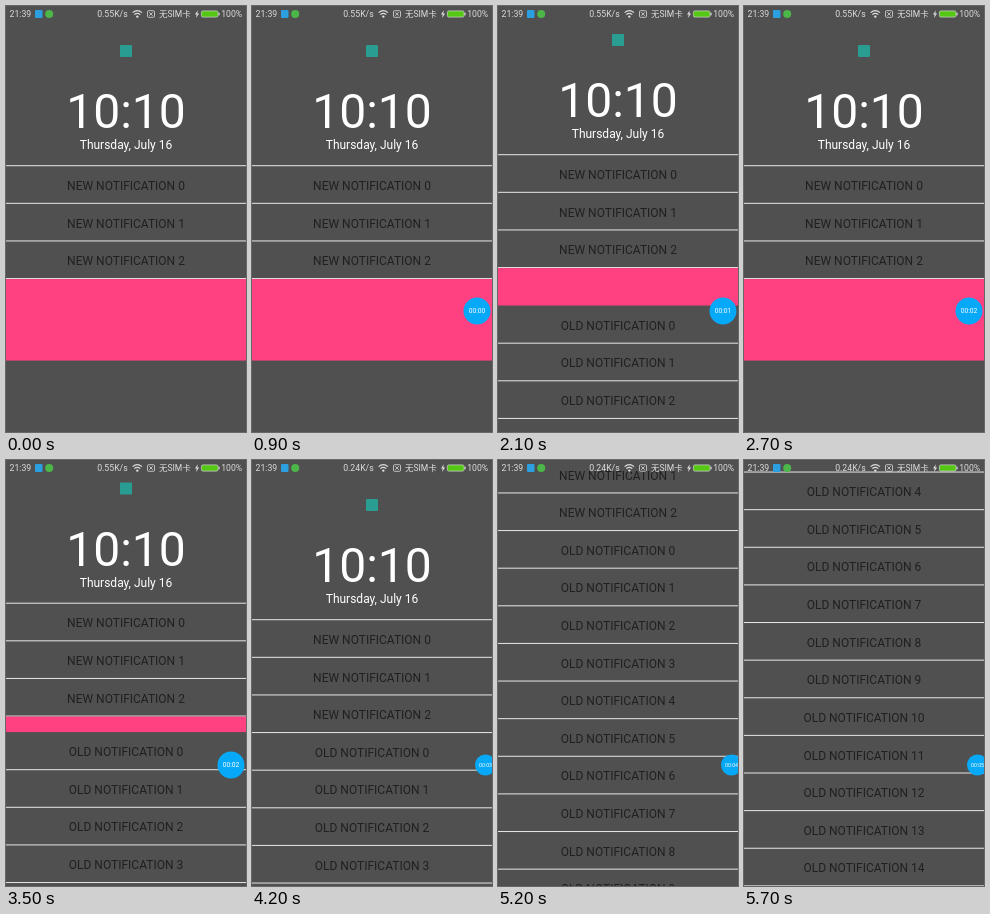
Recreate the animation shown at these times as an HTML page. Size 240 by 426 pixels, loop 5.9 s.

```html
<!DOCTYPE html>
<html lang="en">
<head>
<meta charset="utf-8">
<title>Lock screen notifications</title>
<style>
  html, body { margin: 0; width: 100%; height: 100%; overflow: hidden; background: #505050; }
  svg { display: block; width: 100%; height: 100%; font-family: Roboto, "Noto Sans CJK SC", "Noto Sans CJK", sans-serif; }
  .row text { font-size: 12px; fill: #202020; text-anchor: middle; }
  .row rect { fill: #e6e6e6; }
  #head { fill: #fff; text-anchor: middle; }
  #status { font-size: 8.7px; fill: #dcdcdc; }
  #bubble text { font-size: 6.7px; fill: #fff; text-anchor: middle; }
</style>
</head>
<body>
<svg viewBox="0 0 240 426">
  <rect width="240" height="426" fill="#505050"/>
  <g id="list"></g>
  <rect id="pink" width="240" fill="#ff4081"/>
  <g id="head">
    <rect x="114" y="39" width="12" height="12" rx="1" fill="#2a9d92"/>
    <text x="120" y="122" font-size="48">10:10</text>
    <text x="120" y="143" font-size="12">Thursday, July 16</text>
    <rect y="159.2" width="240" height="1" fill="#e6e6e6"/>
  </g>
  <g id="status">
    <text x="3.6" y="11.4">21:39</text>
    <rect x="29" y="4" width="7.5" height="8" rx="1" fill="#2c9fe0"/>
    <circle cx="43.2" cy="8" r="4" fill="#4cb648"/>
    <text id="speed" x="91.2" y="11.4"></text>
    <g fill="none" stroke="#dcdcdc">
      <path d="M126.6 6.6q4.7-4 9.4 0M128.3 8.6q3-2.5 6 0" stroke-width="1.2"/>
      <rect x="141.5" y="4.7" width="7" height="6.6" rx="1" stroke-width=".8"/>
      <path d="M143.3 6.3l3.4 3.4m0-3.4l-3.4 3.4" stroke-width=".8"/>
    </g>
    <circle cx="131.3" cy="10.6" r="1.2"/>
    <text x="153" y="11.4" font-size="8.5">无SIM卡</text>
    <path d="M191.8 4.2l-2.8 4.3h1.7l-.6 3.5 3-4.5h-1.8z"/>
    <rect x="195.4" y="4.9" width="16.6" height="6.2" rx="1.4" fill="#55c814" stroke="#c4ccc0" stroke-width=".8"/>
    <rect x="212.4" y="6.7" width="1.2" height="2.6"/>
    <text x="215.2" y="11.4">100%</text>
  </g>
  <g id="bubble">
    <circle r="13.5" fill="#06a9f7"/>
    <text y="2.4"></text>
  </g>
</svg>
<script>
const LOOP = 5900, STEP = 100;
const TOP = 159.7, PITCH = 37.62, GAP = 82;
const NEW = 3, OLD = 15;

// [time, value] keys, linear between them
const shift = [
  [1100, 0], [1200, .7], [1600, 4.9], [1800, 7.5], [2000, 10.6], [2100, 11],
  [2200, 8.5], [2300, 5], [2400, 2.8], [2500, 1.3], [2600, .4], [2700, 0],
  [3100, 0], [3200, 1.2], [3300, 5.5], [3400, 11.5], [3500, 16.5], [3600, 18.2], [3700, 18.7],
  [3800, 12], [3900, 6.5], [4000, 2.8], [4100, .8], [4200, 0]
];
const collapse = [[3700, 7.2], [3800, 4.6], [3900, 2.5], [4000, 1.1], [4100, .3], [4200, 0]];
const scroll = [
  [4500, 0], [4600, 4], [4700, 17], [4800, 39], [4900, 66], [5000, 100], [5100, 146],
  [5200, 202], [5300, 259], [5400, 312], [5500, 357], [5600, 391], [5700, 411]
];
const bubbleX = [[0, 256], [500, 224], [600, 225], [3500, 225], [3900, 233.5]];
const bubbleScale = [[0, .6], [500, 1.06], [600, 1], [3500, 1], [3900, .78]];

const $ = id => document.getElementById(id);
const clamp = v => Math.max(0, Math.min(1, v));

function at(keys, t) {
  if (t <= keys[0][0]) return keys[0][1];
  for (let i = 1; i < keys.length; i++) {
    const [t0, a] = keys[i - 1], [t1, b] = keys[i];
    if (t <= t1) return a + (b - a) * (t - t0) / (t1 - t0);
  }
  return keys[keys.length - 1][1];
}

function add(parent, name, attrs) {
  const el = document.createElementNS("http://www.w3.org/2000/svg", name);
  for (const key in attrs) el.setAttribute(key, attrs[key]);
  return parent.appendChild(el);
}

const move = (el, y) => el.setAttribute("transform", `translate(0 ${y})`);

const rows = Array.from({ length: NEW + OLD }, (_, i) => {
  const row = add($("list"), "g", { class: "row" });
  const label = add(row, "text", { x: 120, y: 24.2 });
  label.textContent = i < NEW ? `NEW NOTIFICATION ${i}` : `OLD NOTIFICATION ${i - NEW}`;
  add(row, "rect", { y: PITCH - .5, width: 240, height: 1 });
  return row;
});

const bubble = $("bubble"), timer = bubble.querySelector("text");

function draw(t) {
  const lift = at(shift, t);
  const gap = t < 3700 ? GAP - 4 * lift : at(collapse, t);
  const open = 1 - gap / GAP;
  const offset = -lift - at(scroll, t);

  move($("head"), offset);
  rows.forEach((row, i) => {
    const old = i - NEW;
    move(row, TOP + i * PITCH + offset + (old < 0 ? 0 : gap));
    row.setAttribute("opacity", old < 0 ? 1 : clamp(3.4 * open - .3 * Math.min(old, 4)));
  });

  const pinkTop = TOP + NEW * PITCH + offset + .5;
  $("pink").setAttribute("y", pinkTop);
  $("pink").setAttribute("height", Math.max(0, gap - .5));

  $("speed").textContent = t < 3800 ? "0.55K/s" : "0.24K/s";
  const seconds = Math.max(0, Math.floor((t - 600) / 1000));
  timer.textContent = `00:0${seconds}`;
  bubble.setAttribute("transform", `translate(${at(bubbleX, t)} 305) scale(${at(bubbleScale, t)})`);
}

const start = performance.now();
function tick() {
  const t = (performance.now() - start) % LOOP;
  draw(Math.floor(t / STEP) * STEP);
  requestAnimationFrame(tick);
}
tick();
</script>
</body>
</html>
```
